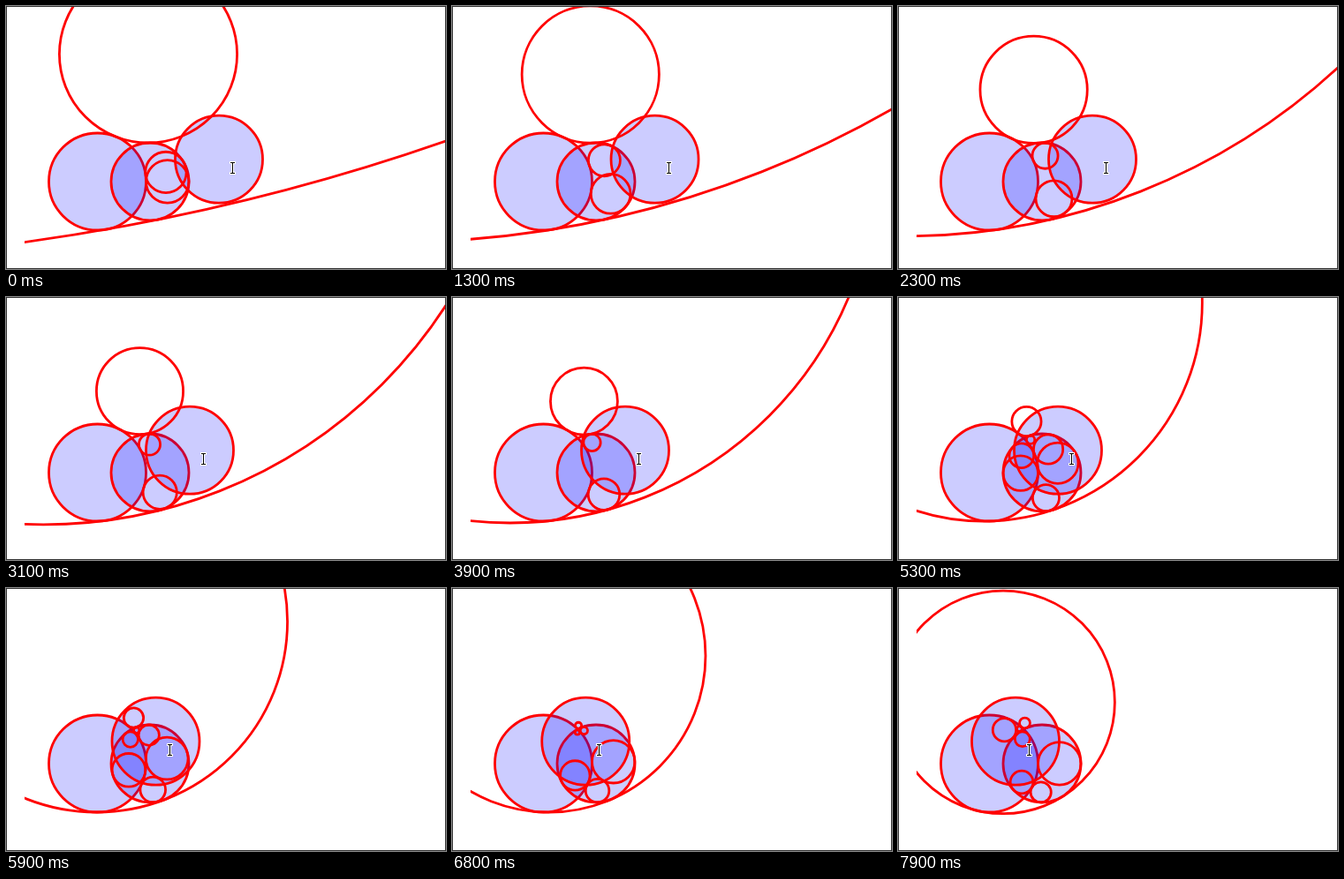
These frames come from a looping animation (498x298 px, 8 s). An HTML page with a canvas:

```html
<!DOCTYPE html>
<html lang="en">
<head>
<meta charset="utf-8">
<title>Circles of Apollonius</title>
<style>
html, body { margin: 0; width: 100%; height: 100%; overflow: hidden; background: #fff; }
canvas { display: block; }
</style>
</head>
<body>
<canvas id="stage" width="498" height="298"></canvas>
<script>
const ctx = document.getElementById('stage').getContext('2d');
const LOOP = 8000, STEP = 100;
const PAUSES = [4100, 7600, 7700];
const A = { x: 103.5, y: 199, r: 55 };
const B = { x: 163, y: 199, r: 44 };
const C = { y: 173.7, r: 49.5 };

// [move, x] where the dragging changes pace; the solution trails behind the disc
const DRAG = [[0, 241], [22, 220], [38, 196], [45, 192.5], [57, 169.5], [75, 133]];
const SOLVED = [[0, 252.1], [18, 233.8], [38, 217], [48, 204.9], [73, 188.4], [75, 181.8]];

const moves = t =>
  Math.max(0, Math.floor(t / STEP) - 1 - PAUSES.filter(p => p <= t).length);

function track(keys, n) {
  const i = Math.max(1, keys.findIndex(k => n <= k[0]));
  const [n0, x0] = keys[i - 1], [n1, x1] = keys[i];
  return x0 + (x1 - x0) * (n - n0) / (n1 - n0);
}

// Circles tangent to a, b and c; the signs choose inner or outer contact.
function tangents(a, b, c, sb, sc) {
  const row = (o, s) => {
    const x = o.x - a.x, y = o.y - a.y;
    return { x, y, k: (x * x + y * y + a.r * a.r - o.r * o.r) / 2, m: a.r - s * o.r };
  };
  const p = row(b, sb), q = row(c, sc);
  const det = p.x * q.y - p.y * q.x;
  const x0 = (p.k * q.y - p.y * q.k) / det, x1 = (p.m * q.y - p.y * q.m) / det;
  const y0 = (p.x * q.k - p.k * q.x) / det, y1 = (p.x * q.m - p.m * q.x) / det;
  const qa = x1 * x1 + y1 * y1 - 1;
  const qb = x0 * x1 + y0 * y1 - a.r;
  const qc = x0 * x0 + y0 * y0 - a.r * a.r;
  const disc = qb * qb - qa * qc;
  if (disc < 0) return [];
  return [1, -1].map(s => {
    const r = (-qb + s * Math.sqrt(disc)) / qa;
    return { x: a.x + x0 + x1 * r, y: a.y + y0 + y1 * r, r: Math.abs(r) };
  });
}

function circle(o, filled) {
  ctx.beginPath();
  ctx.arc(o.x, o.y, o.r, 0, Math.PI * 2);
  if (filled) ctx.fill();
  ctx.stroke();
}

// Dark I-beam with a light halo
function cursor(x, y) {
  for (const [color, pad] of [['#fff', 1], ['#000', 0]]) {
    const bar = (dx, dy, w, h) =>
      ctx.fillRect(x + dx - pad, y + dy - pad, w + 2 * pad, h + 2 * pad);
    ctx.fillStyle = color;
    bar(-2, -6, 5, 1);
    bar(-2, 6, 5, 1);
    bar(0, -6, 1, 13);
  }
}

function draw(t) {
  const n = moves(t);
  const x = track(DRAG, n);
  const goal = { ...C, x: track(SOLVED, n) };
  ctx.fillStyle = '#fff';
  ctx.fillRect(0, 0, 498, 298);

  ctx.save();
  ctx.beginPath();
  ctx.rect(21, 1, 476, 296);
  ctx.clip();
  ctx.lineWidth = 2.8;
  ctx.strokeStyle = '#f00';
  ctx.fillStyle = 'rgba(0,0,255,0.2)';
  for (const o of [A, B, { ...C, x }]) circle(o, true);
  for (const sb of [1, -1])
    for (const sc of [1, -1])
      for (const o of tangents(A, B, goal, sb, sc)) circle(o, false);
  ctx.restore();

  cursor(Math.round(x + 15), 183);
  ctx.lineWidth = 1;
  ctx.strokeStyle = '#333';
  ctx.strokeRect(0.5, 0.5, 497, 297);
}

const start = performance.now();
function tick() {
  draw((performance.now() - start) % LOOP);
  requestAnimationFrame(tick);
}
tick();
</script>
</body>
</html>
```
